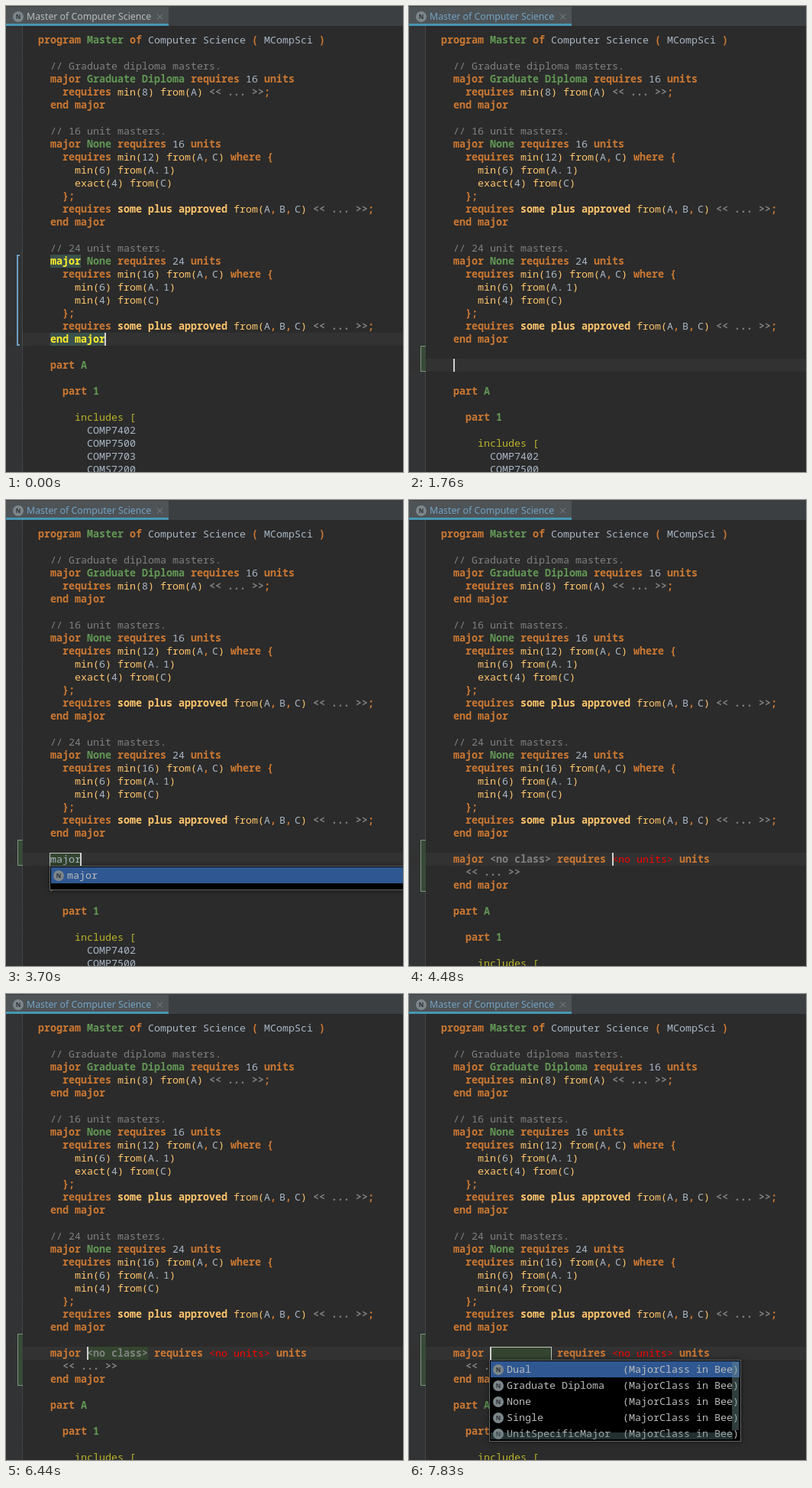
Animation, 520 px wide and 609 px high, one loop 8000 ms. Source, as an HTML page with a canvas:

```html
<!DOCTYPE html>
<html lang="en">
<head>
<meta charset="utf-8">
<title>Structured editor</title>
<style>
html, body { margin: 0; width: 100%; height: 100%; overflow: hidden; background: #2b2b2b; }
canvas { display: block; }
</style>
</head>
<body>
<canvas id="stage" width="520" height="609"></canvas>
<script>
const ctx = document.getElementById('stage').getContext('2d');
const LOOP = 8000, TOP = 36, PITCH = 17, CHAR = 8;
const MONO = '13.333px "Noto Sans Mono", monospace';
const PLAIN = '#a9b7c6', DIM = '#808080', GREEN_CELL = '#34452f', MATCH = '#3b514d';

// Style letters: colour, weight, extra space after the text.
const STYLES = {
  k: ['#cc7832', 600, 0],
  g: ['#629755', 600, 0],
  p: [PLAIN, 400, 0],
  c: [DIM, 400, 0],
  h: [DIM, 600, 0],
  f: ['#ffc66d', 400, 0],
  b: ['#ffc66d', 600, 0],
  y: ['#bbb529', 400, 0],
  s: ['#cc7832', 600, 4],
  d: [PLAIN, 400, 4],
  r: ['#ff0000', 400, 0],
  x: ['#ff0000', 600, 0],
  m: ['#ffef28', 600, 0]
};

const call = (name, arg) => `~f${name}(~p${arg}~f)`;
const AC = call('from', 'A~s,~pC');
const ABC = call('from', 'A~s,~pB~s,~pC');
const FOLD = '~h<< ... >>';
const APPROVED = `~krequires ~bsome plus approved ${ABC} ${FOLD}~k;`;
const END = '~kend major';
const major = (name, units) => `~kmajor ~g${name} ~krequires ~p${units} ~kunits`;

// Each entry: indent in characters, marked-up text.
const HEAD = [
  [0, '~kprogram ~gMaster ~kof ~pComputer Science ~k( ~pMCompSci ~k)'],
  null,
  [2, '~c// Graduate diploma masters.'],
  [2, major('Graduate Diploma', 16)],
  [4, `~krequires ${call('min', 8)} ${call('from', 'A')} ${FOLD}~k;`],
  [2, END],
  null,
  [2, '~c// 16 unit masters.'],
  [2, major('None', 16)],
  [4, `~krequires ${call('min', 12)} ${AC} ~kwhere {`],
  [6, `${call('min', 6)} ${call('from', 'A~d.~p1')}`],
  [6, `${call('exact', 4)} ${call('from', 'C')}`],
  [4, '~k};'],
  [4, APPROVED],
  [2, END],
  null,
  [2, '~c// 24 unit masters.'],
  [2, major('None', 24)],
  [4, `~krequires ${call('min', 16)} ${AC} ~kwhere {`],
  [6, `${call('min', 6)} ${call('from', 'A~d.~p1')}`],
  [6, `${call('min', 4)} ${call('from', 'C')}`],
  [4, '~k};'],
  [4, APPROVED],
  [2, END],
  null
];
const TAIL = [
  [2, '~kpart ~gA'],
  null,
  [4, '~kpart ~g1'],
  null,
  [6, '~yincludes ['],
  [8, '~pCOMP7402'],
  [8, '~pCOMP7500'],
  [8, '~pCOMP7703'],
  [8, '~pCOMS7200']
];

// Caret position over time; -1 means hidden.
const CARET = [
  [0, 129], [160, -1], [690, 129], [1200, -1], [1550, 58],
  [2700, 65], [2830, 73], [2960, 81], [3130, 89], [3210, 97],
  [4480, 266], [5140, -1], [5520, 266], [5720, 257],
  [6440, 106], [6480, 97], [6520, 89], [6560, 81], [6600, 73],
  [6860, 81], [7020, 89], [7160, 97], [7300, 106]
];
const TYPED = [[0, 0], [2700, 1], [2830, 2], [2960, 3], [3130, 4], [3210, 5]];

const stepAt = (steps, t) => steps.reduce((v, [at, value]) => (t >= at ? value : v), 0);
const between = (t, a, b) => t >= a && t < b;
const rowY = i => TOP + i * PITCH;

function box(x, y, w, h, color) {
  ctx.fillStyle = color;
  ctx.fillRect(x, y, w, h);
}

function frame(x, y, w, h, color) {
  ctx.strokeStyle = color;
  ctx.lineWidth = 1;
  ctx.strokeRect(x + 0.5, y + 0.5, w - 1, h - 1);
}

function write(text, x, baseline, color, font = MONO) {
  ctx.font = font;
  ctx.fillStyle = color;
  ctx.fillText(text, x, baseline);
}

function drawLine(row, indent, markup) {
  let x = 42 + indent * CHAR;
  for (const part of markup.split('~').slice(1)) {
    const [color, weight, gap] = STYLES[part[0]];
    const text = part.slice(1);
    write(text, x, rowY(row) + 13, color, `${weight} ${MONO}`);
    x += text.length * CHAR + gap;
  }
}

function drawLines(lines, first) {
  lines.forEach((line, i) => line && drawLine(first + i, ...line));
}

function nodeIcon(x, y) {
  ctx.beginPath();
  ctx.arc(x, y, 7, 0, Math.PI * 2);
  ctx.fillStyle = '#7c868b';
  ctx.fill();
  ctx.textAlign = 'center';
  write('N', x, y + 3, '#2b3033', 'bold 8px "Noto Sans", sans-serif');
  ctx.textAlign = 'left';
}

function drawTab(modified) {
  box(0, 0, 520, 26, '#3c3f41');
  box(0, 1, 213, 22, '#4e5356');
  box(0, 23, 213, 3, '#4796b3');
  nodeIcon(16, 14);
  write('Master of Computer Science', 27, 18, modified ? '#72a3c6' : '#bbbbbb',
    '12.3px "Noto Sans", sans-serif');
  ctx.beginPath();
  ctx.moveTo(198, 10.5); ctx.lineTo(205, 17.5);
  ctx.moveTo(205, 10.5); ctx.lineTo(198, 17.5);
  ctx.strokeStyle = '#7e8386';
  ctx.lineWidth = 1;
  ctx.stroke();
}

function drawGutter(caretRow) {
  box(0, 26, 21, 583, '#313335');
  box(0, caretRow, 520, PITCH, '#323232');
  ctx.setLineDash([1, 1]);
  ctx.beginPath();
  ctx.moveTo(21.5, 26);
  ctx.lineTo(21.5, 609);
  ctx.strokeStyle = '#606060';
  ctx.lineWidth = 1;
  ctx.stroke();
  ctx.setLineDash([]);
}

function openBracket(x, right, y, end, color, width) {
  const inset = width / 2;
  ctx.beginPath();
  ctx.moveTo(right, y + inset);
  ctx.lineTo(x + inset, y + inset);
  ctx.lineTo(x + inset, end - inset);
  ctx.lineTo(right, end - inset);
  ctx.strokeStyle = color;
  ctx.lineWidth = width;
  ctx.stroke();
}

function changeBar(y, h) {
  box(15, y, 7, h, '#374a37');
  openBracket(15, 22, y, y + h, '#7f957d', 1);
}

function matchBlock(firstRow, lastRow) {
  const y = rowY(firstRow), end = rowY(lastRow);
  openBracket(14, 18, y, end + PITCH, '#6f9fc0', 2);
  box(58, y, 40, PITCH, MATCH);
  box(58, end, 72, PITCH, MATCH);
  drawLine(firstRow, 2, '~mmajor');
  drawLine(lastRow, 2, '~mend major');
}

function patternField(x, w, text) {
  box(x, 461, w, 18, GREEN_CELL);
  frame(x, 461, w, 18, '#c0c4c0');
  write(text, x + 1, 474, PLAIN);
}

function popup(x, w, h, items, note) {
  const y = 478;
  ctx.save();
  ctx.shadowColor = 'rgba(0,0,0,.45)';
  ctx.shadowBlur = 8;
  box(x, y, w, h, '#000000');
  ctx.restore();
  box(x + 2, y + 2, w - 4, 21, '#2f5791');
  ctx.save();
  ctx.beginPath();
  ctx.rect(x + 1, y + 1, w - 2, h - 2);
  ctx.clip();
  items.forEach((item, i) => {
    const mid = y + 13 + i * 21;
    nodeIcon(x + 12, mid);
    write(item, x + 23, mid + 4, '#bbbbbb');
    write(note, x + 175, mid + 4, '#bbbbbb');
  });
  ctx.restore();
  if (items.length > 1) {
    box(x + 318, y + 3, 9, 89, 'rgba(105,135,135,.45)');
    box(x + 2, y + h - 12, 317, 9, 'rgba(90,120,120,.4)');
  }
  frame(x, y, w, h, '#5e6264');
}

function drawNewMajor(t) {
  if (t < 4480) {
    drawLine(25, 2, '~x' + 'major'.slice(0, stepAt(TYPED, t)));
    return;
  }
  if (between(t, 5720, 6440)) box(194, 461, 64, PITCH, GREEN_CELL);
  if (between(t, 6440, 6480) || t >= 7300) box(106, 461, 80, PITCH, GREEN_CELL);
  drawLine(25, 2, '~kmajor ~h<no class> ~krequires ~r<no units>~k units');
  drawLine(26, 4, FOLD);
  drawLine(27, 2, END);
  if (between(t, 6480, 7300)) matchBlock(25, 27);
}

function caretAt(t) {
  // Key repeat walks left through "requires".
  if (between(t, 6060, 6440)) return 249 - CHAR * Math.floor((t - 6060) / 47.5);
  return stepAt(CARET, t);
}

function draw(t) {
  const entered = t >= 1550, expanded = t >= 4480;
  const caretRow = rowY(entered ? 25 : 23);

  box(0, 0, 520, 609, '#2b2b2b');
  drawGutter(caretRow);
  if (entered) changeBar(444, expanded ? 68 : 34);
  drawLines(HEAD, 0);
  drawLines(TAIL, expanded ? 29 : entered ? 27 : 25);
  if (entered) drawNewMajor(t);
  else matchBlock(17, 23);
  drawTab(t >= 1760);

  if (between(t, 3700, 4440)) {
    patternField(57, 42, 'major');
    popup(57, 480, 32, ['major'], '');
  }
  if (t >= 7830) {
    patternField(106, 81, '');
    popup(105, 330, 107,
      ['Dual', 'Graduate Diploma', 'None', 'Single', 'UnitSpecificMajor'],
      '(MajorClass in Bee)');
  }

  const caret = caretAt(t);
  if (caret >= 0) box(caret, caretRow, 2, PITCH, '#d0d0d0');
}

function tick() {
  draw(performance.now() % LOOP);
  requestAnimationFrame(tick);
}
tick();
</script>
</body>
</html>
```
